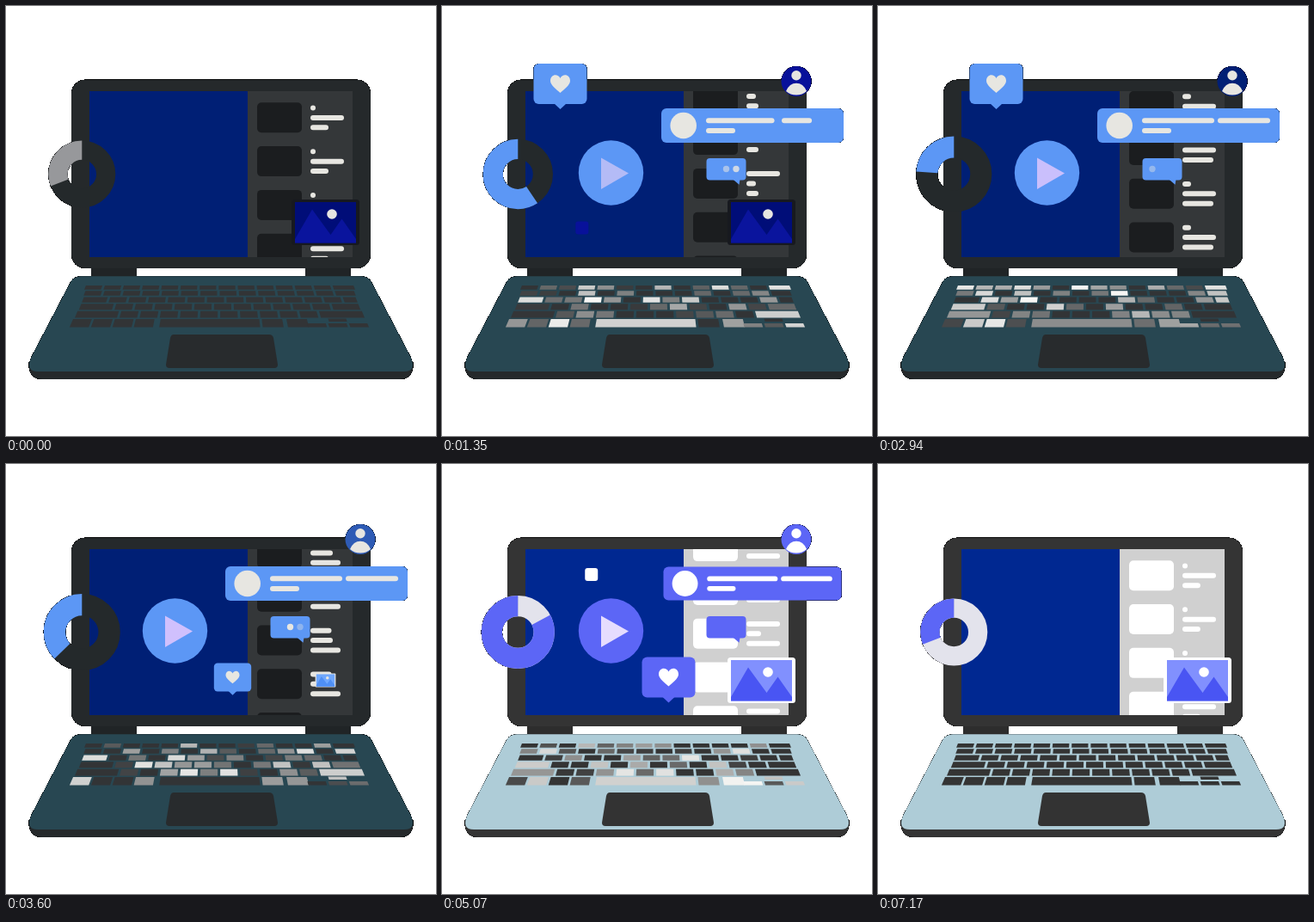
An HTML page with a canvas that plays this animation: 500x500 px, repeating every 7.23 s.

```html
<!DOCTYPE html>
<html lang="en">
<head>
<meta charset="utf-8">
<title>Laptop</title>
<style>
  html, body { margin: 0; width: 100%; height: 100%; overflow: hidden; background: #fff; }
  canvas { display: block; width: 500px; height: 500px; }
</style>
</head>
<body>
<canvas id="stage" width="500" height="500"></canvas>
<script>
const LOOP = 7230, STEP = 30;
const ctx = document.getElementById('stage').getContext('2d', { willReadFrequently: true });

// [dark theme, light theme]
const THEME = {
  shell: ['#25292b', '#343434'],
  hinge: ['#202426', '#2d2d2d'],
  deck: ['#284752', '#aeccd7'],
  pad: ['#282b2d', '#333333'],
  key: ['#323436', '#343434'],
  video: ['#001f75', '#002891'],
  side: ['#343739', '#d0d0d0'],
  thumb: ['#1b1d1f', '#ffffff'],
  ink: ['#e7e6e1', '#ffffff'],
  accent: ['#5c97f5', '#5c66f6'],
  ring: ['#24292b', '#e3e3ec'],
  sky: ['#70a8fd', '#8190fe'],
  hill: ['#4f8ff4', '#4955f3']
};
const NIGHT_PICTURE = { ink: '#17191f', sky: '#000d78', hill: '#0a149d' };
const NAVY = '#08119a';

// Key poses: values at shared times
const PITCH = 50.8;
const POSES = [0, 1350, 2940, 4260, 5070, 6300, LOOP];
const RING_ANGLE = [111, 214, 86, 182, 298, 157, 111];
const SCROLL = [0, 25, 64, 90.5, 85, 53, PITCH];
const LINES = [
  [6, 39, 10, 39, 39, 6, 6],
  [39, 11, 39, 13, 17, 39, 39],
  [21, 14, 36, 34, 39, 8, 21]
];

const clamp = v => Math.max(0, Math.min(1, v));
const ramp = (t, a, b) => clamp((t - a) / (b - a));
const smooth = k => k * k * (3 - 2 * k);
const ease = (t, a, b) => smooth(ramp(t, a, b));
const hash = n => { const v = Math.sin(n * 127.1 + 3.7) * 43758.5453; return v - Math.floor(v); };

function pose(values, t) {
  const i = POSES.findIndex(time => t < time) - 1;
  return values[i] + (values[i + 1] - values[i]) * ease(t, POSES[i], POSES[i + 1]);
}

function mix(a, b, k) {
  const part = (c, i) => parseInt(c.slice(i, i + 2), 16);
  return '#' + [1, 3, 5].map(i =>
    Math.round(part(a, i) + (part(b, i) - part(a, i)) * k).toString(16).padStart(2, '0')).join('');
}

function fill(color) { ctx.fillStyle = color; ctx.fill(); }

function box(x, y, w, h, r, color) {
  ctx.beginPath();
  ctx.roundRect(x, y, w, h, Math.min(r, w / 2, h / 2));
  fill(color);
}

function disc(x, y, r, color) {
  ctx.beginPath();
  ctx.arc(x, y, r, 0, 7);
  fill(color);
}

function poly(color, ...p) {
  ctx.beginPath();
  for (let i = 0; i < p.length; i += 2) ctx.lineTo(p[i], p[i + 1]);
  ctx.closePath();
  fill(color);
}

function shape(d, color) { ctx.fillStyle = color; ctx.fill(new Path2D(d)); }

const bar = (x, y, w, color) => box(x, y - 3, w, 6, 3, color);

// Scales a drawing about its centre as it enters and leaves
function pop(t, start, end, x, y, draw) {
  const s = ease(t, start, start + 330) * (1 - ease(t, end, end + 330));
  if (s < 0.01) return;
  ctx.save();
  ctx.translate(x, y);
  ctx.scale(s, s);
  draw();
  ctx.restore();
}

function drawKeys(t, c) {
  const power = ramp(t, 90, 450) * (1 - ramp(t, 6750, 7110));
  let id = 0;
  const key = (x0, x1, y0, y1) => {
    id++;
    const phase = (t / (900 + 700 * hash(id)) + hash(id + 200)) % 1;
    const glow = clamp(1.5 - Math.abs(phase - 0.5) * 4.6) * (0.35 + 0.65 * hash(id + 400));
    const lean = (y1 - y0) * 0.00125;
    const at = (x, k) => x + (x - 248.5) * k * lean;
    poly(mix(c.key, '#f7f7f5', glow * power),
      at(x0, -1), y0, at(x1, -1), y0, at(x1, 1), y1, at(x0, 1), y1);
  };

  // Each row is wider than the one above, with a longer first and last key
  const rowTop = i => 325 + 6 * i + 0.36 * i * i;
  for (let i = 0; i < 5; i++) {
    const y0 = rowTop(i), y1 = rowTop(i + 1) - 1.6;
    const half = 156.5 + 0.65 * i * i;
    const pitch = 22.2 + 0.25 * i;
    let x = 248.5 - half;
    let next = x + pitch * Math.max(1, 0.5 + 0.43 * i);
    for (let n = Math.min(12, 14 - i); n >= 0; n--) {
      key(x, next - 3, y0, y1);
      x = next;
      next += pitch;
    }
    key(x, 248.5 + half, y0, y1);
  }

  // Bottom row: four keys, space bar, two keys, arrows
  const y = rowTop(5), end = y + 9.5;
  for (let x = 76; x < 160; x += 24.6) key(x, x + 22, y, end);
  key(179, 295, y, end);
  for (let x = 298; x < 330; x += 29) key(x, x + 24, y, end);
  for (let x = 351; x < 405; x += 24.3) key(x, x + 21.5, y + 5, end);
  key(375, 396, y - 0.5, y + 3);
}

function drawLaptop(t, c) {
  box(99, 302, 53, 14, 0, c.hinge);
  box(348, 302, 53, 14, 0, c.hinge);
  box(76, 85.7, 348, 219.3, 16, c.shell);
  shape('M26.7 414V420Q28 434 42 434H458Q472 434 473.3 420V414Z', c.shell);
  shape('M87 314.3H413Q421 314.3 425 321L470.5 408Q478 425 463 425H37Q22 425 29.5 408L75 321Q79 314.3 87 314.3Z', c.deck);
  shape('M195 382H306Q310 382 311 386L316 417Q316 421 312 421H190Q186 421 186 417L191 386Q192 382 195 382Z', c.pad);
  drawKeys(t, c);
}

function drawScreen(t, c) {
  ctx.save();
  ctx.beginPath();
  ctx.rect(97, 99, 306, 193);
  ctx.clip();
  box(97, 99, 306, 193, 0, c.video);
  box(281, 99, 122, 193, 0, c.side);
  const top = 112.3 - pose(SCROLL, t);
  for (let i = 0; i < 6; i++) {
    const y = top + i * PITCH;
    box(292, y, 52, 35, 5, c.thumb);
    LINES.forEach((line, n) => bar(354, y + 6.2 + n * 11.4, pose(line, t), c.ink));
  }
  ctx.restore();
}

function drawRing(t, c) {
  const r = 39 + 5.5 * Math.sin(Math.PI * t / LOOP) ** 2;
  const start = -Math.PI / 2;
  const arc = (degrees, color) => {
    ctx.beginPath();
    ctx.arc(88.3, 195.5, r * 0.715, start, start - degrees * Math.PI / 180, true);
    ctx.strokeStyle = color;
    ctx.lineWidth = r * 0.57;
    ctx.stroke();
  };
  arc(360, c.ring);
  arc(pose(RING_ANGLE, t), mix('#97989b', c.accent, ramp(t, 30, 400)));
}

function drawPlay(t, c) {
  const warm = mix(mix('#b2bbf6', '#d0c0fd', ramp(t, 1200, 3400)), '#ffffff', ramp(t, 4440, 5800));
  disc(0, 0, 37.7, c.accent);
  poly(warm, -11.5, -17.5, 20.5, 0.5, -11.5, 19);
}

function drawHeart(c) {
  box(-31, -23.5, 62, 47, 6, c.accent);
  poly(c.accent, -7, 23, 7, 23, 0, 29.5);
  shape('M0 10.5C-4 7-11.5 1.5-11.5-3.5C-11.5-11-3-12.5 0-6.5C3-12.5 11.5-11 11.5-3.5C11.5 1.5 4 7 0 10.5Z', c.ink);
}

function drawMessage(t, c) {
  box(-106, -20, 212, 40, 6, c.accent);
  disc(-80.3, 0, 15.3, c.ink);
  bar(-54, -5.7, 84 * ease(t, 920, 1420), c.ink);
  bar(34, -5.7, 61 * ease(t, 1020, 1620), c.ink);
  bar(-54, 6, 34 * ease(t, 850, 1250), c.ink);
}

function drawChat(t, c) {
  box(-23, -12.7, 46, 25.5, 4, c.accent);
  poly(c.accent, 8, 12, 16, 12, 15, 18);
  const phase = t / (LOOP / 3) % 1;
  [0.32, 0.48, 0.6].forEach((peak, i) => {
    ctx.globalAlpha = clamp(1.1 * (1 - Math.abs(phase - peak) / 0.16));
    disc(-11.5 + i * 11.5, -0.3, 3.7, c.ink);
  });
  ctx.globalAlpha = 1;
}

function drawAvatar(t, c, light) {
  const night = mix(mix(NAVY, THEME.video[0], ramp(t, 1800, 2700)), THEME.accent[0], ramp(t, 3300, 3900));
  disc(0, 0, 17.5, mix(night, c.accent, light));
  disc(0, -6.8, 5.7, c.ink);
  shape('M-12 11.5Q-8 2.3 0 2.3Q8 2.3 12 11.5Q7 16 0 16Q-7 16-12 11.5Z', c.ink);
}

function drawPicture(c, sun) {
  box(-39.5, -26.5, 79, 53, 3.5, c.ink);
  box(-35.5, -23.5, 71, 47.5, 0, c.sky);
  poly(c.hill, -35.5, 24, -35.5, 19.5, -15.5, -15, 6, 14.5, 19, -4, 35.5, 19.5, 35.5, 24);
  disc(7.5, -9.5, 5.8, sun);
}

// Small tiles fly into the screen, from the left and right by turns
function drawFlights(t) {
  [810, 2370, 4560, 6390].forEach((start, n) => {
    if (t < start || t > start + 560) return;
    const k = 1 - (1 - ramp(t, start, start + 560)) ** 2;
    const x = 17 + (146 + 6 * n) * k;
    const y = 200 + (58 - 65 * n) * k;
    box((n % 2 ? 500 - x : x) - 7.5, y - 7.5, 15, 15, 3, t < 3000 ? NAVY : '#ffffff');
  });
}

// One-bit transparency: soft outer edges become thin dark ones
function hardenEdges() {
  const image = ctx.getImageData(0, 0, 500, 500);
  const d = image.data;
  for (let i = 0; i < d.length; i += 4) {
    const a = d[i + 3];
    if (a === 0 || a === 255) continue;
    for (let j = i; j < i + 3; j++) d[j] *= a / 255;
    d[i + 3] = a > 40 ? 255 : 0;
  }
  ctx.putImageData(image, 0, 0);
}

function draw(t) {
  const light = ramp(t, 4410, 4710);
  const c = {};
  for (const name in THEME) c[name] = mix(...THEME[name], light);

  ctx.clearRect(0, 0, 500, 500);
  drawLaptop(t, c);
  drawScreen(t, c);
  drawFlights(t);
  pop(t, 120, 6780, 196.5, 194, () => drawPlay(t, c));
  drawRing(t, c);
  pop(t, 330, 3060, 137.5, 90.5, () => drawHeart(c));
  pop(t, 3390, 6780, 263.5, 248, () => drawHeart(c));
  pop(t, 420, 5040, 361, 139, () => drawMessage(t, c));
  pop(t, 570, 6780, 330.5, 189.8, () => drawChat(t, c));
  pop(t, 240, 6780, 412, 87.5, () => drawAvatar(t, c, light));
  pop(t, -400, 2430, 371.5, 251.5, () => drawPicture(NIGHT_PICTURE, c.ink));
  pop(t, 3480, LOOP, 371.5, 251.5, () => drawPicture(c, c.ink));
  hardenEdges();
}

const begin = performance.now();
function tick() {
  const t = Math.max(0, performance.now() - begin) % LOOP;
  draw(Math.min(Math.floor(t / STEP) * STEP, LOOP - 2 * STEP));
  requestAnimationFrame(tick);
}
tick();
</script>
</body>
</html>
```
